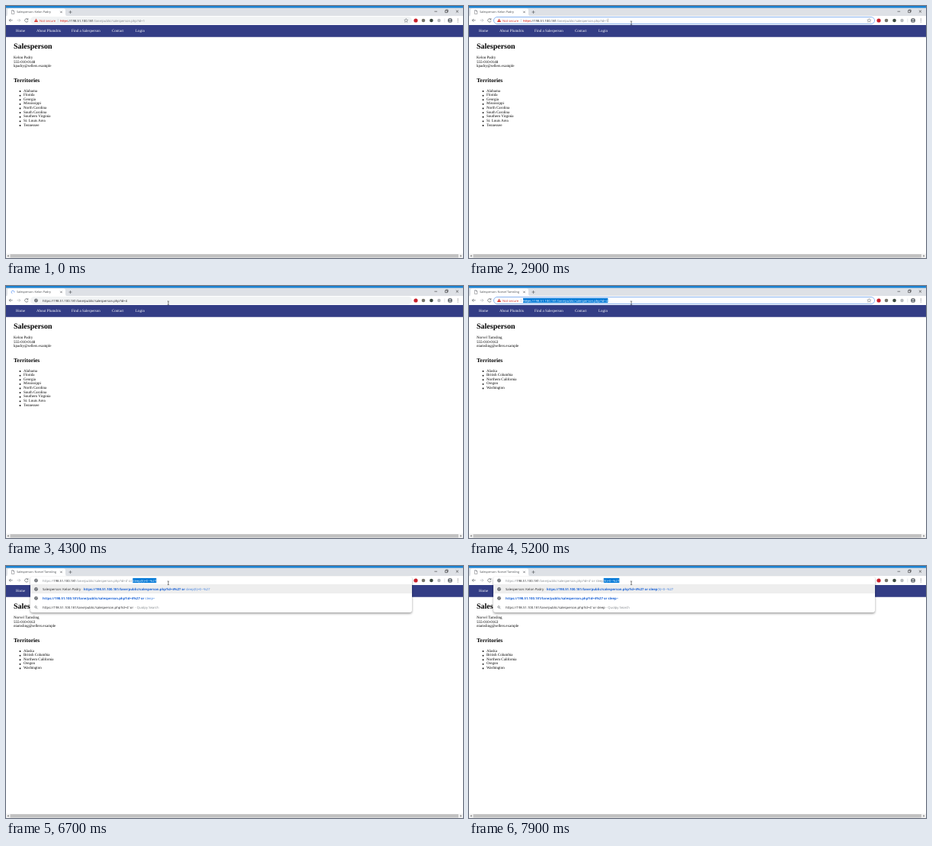
An HTML page that plays this animation: 600 by 331 pixels, repeating every 8 s.

```html
<!DOCTYPE html>
<html lang="en">
<head>
<meta charset="utf-8">
<title>Browser session</title>
<style>
  html, body { margin: 0; width: 100%; height: 100%; overflow: hidden; background: #fff; }
  #stage { position: absolute; left: 0; top: 0; width: 600px; height: 331px; overflow: hidden;
    text-rendering: geometricPrecision; }
  #stage > svg, #view { position: absolute; left: 0; top: 0; }
  #view div { position: absolute; box-sizing: border-box; }
  /* Text is set at desktop size (1920 wide) and scaled to the 600 wide stage */
  .t { white-space: pre; transform-origin: 0 0; transform: scale(.3125) translateY(-50%); }
  .ui { font: 13.4px/26px "Open Sans", "Noto Sans", sans-serif; color: #202124; }
  .row { font-size: 13.6px; }
  .tab { font-size: 12.2px; color: #45494d; }
  .page { font: 16px/26px "Liberation Serif", serif; color: #000; }
  .h1 { font-size: 32px; font-weight: bold; }
  .h2 { font-size: 24px; font-weight: bold; }
  .nav { color: #fff; }
  .red { color: #d93025; }
  .strike { color: #d93025; text-decoration: line-through; text-decoration-thickness: 1px; }
  .dim { color: #80868b; }
  .link { color: #3b7de0; }
  .link b { color: #1a62d6; }
  .sel, .sel span { background: #0078d7; color: #fff; }
  .sel { padding: 1px 0; }
  .caret { display: inline-block; width: 1.5px; height: 17px; background: #333; vertical-align: -3px; }
  .pill { left: 32px; top: 14px; width: 501px; height: 9.6px; border-radius: 5px; background: #f1f3f4; }
  .focus { background: #fff; border: .7px solid #8ab4f0; }
  .drop { left: 32px; top: 13.5px; width: 501px; border-radius: 3px; background: #fff;
    box-shadow: 0 1.5px 3px rgba(0, 0, 0, .4); }
  .hot { left: 32px; top: 24.4px; width: 501px; height: 12px; background: #eeeeee; }
</style>
</head>
<body>
<div id="stage">
  <svg width="600" height="331" fill="none" stroke="#5f6368" stroke-width=".7">
    <g stroke="none">
      <path fill="#dee1e6" d="M0 0h600v13.5H0z"/>
      <path fill="#1a82d2" d="M0 0h600v2.6H0z"/>
      <path fill="#fff" d="M0 13.5Q2 13 2 10.500V5.500Q2 3.200 4.300 3.200H75.700Q78 3.200 78 5.500V10.500Q78 13 80 13H600V25H0z"/>
      <path fill="#333d85" d="M0 25h600v15.800H0z"/>
      <path fill="#f1f1f1" d="M0 325.500h600v5.500H0z"/>
      <path fill="#c1c1c1" d="M5.500 326h588.500v4.500H5.500z"/>
      <path fill="#707070" d="M3.500 326.800v3l-1.800-1.500zM596.500 326.800v3l1.800-1.500z"/>
      <circle cx="538" cy="19" r="2.600" fill="#c8202b"/>
      <circle cx="548" cy="19" r="2.300" fill="#77756c"/>
      <circle cx="558.500" cy="19" r="2.300" fill="#3d4a40"/>
      <circle cx="568.500" cy="19" r="2.200" fill="#b5b8bb"/>
      <circle cx="583" cy="19" r="3" fill="#6a6f75"/>
      <circle cx="583" cy="18.200" r="1.100" fill="#c5c8cb"/>
      <path fill="#c5c8cb" d="M581 21.200q2-2.400 4 0z"/>
      <path fill="#5f6368" d="M592.800 16.500h.9v.9h-.9zM592.800 18.600h.9v.9h-.9zM592.800 20.700h.9v.9h-.9z"/>
    </g>
    <path d="M71.300 6.700l2.400 2.400m0-2.400l-2.400 2.400M82.500 8h4M84.500 6v4"/>
    <path stroke="#333" stroke-width=".6" d="M562.500 7.200h3.600M576.600 5.800h2.800v2.800h-2.800zM577.500 5.800v-.8h2.700v2.800h-.8M590.800 5.500l3.200 3.200m0-3.200l-3.200 3.200"/>
    <path d="M8.600 18.800H4.200m2-2l-2 2 2 2"/>
    <path stroke="#b4b7ba" d="M14.500 18.800h4.400m-2-2l2 2-2 2"/>
    <path d="M28.600 17.500a2.200 2.200 0 1 0 .4 2M28.900 16.200v1.700h-1.800"/>
    <path stroke="#dadce0" d="M575.800 16.500v5"/>
  </svg>
  <div id="view"></div>
</div>
<script>
const LOOP = 8000;
const URL_BASE = "https://198.51.100.181/lane/public/salesperson.php?id=";
const ATTACK = "4%27 or sleep(5)=0--%27";
const LINE = 5.625;
const PEOPLE = [
  { name: "Kelon Padry", phone: "555-010-0148", mail: "kpadry@sellers.example", id: "1",
    areas: ["Alabama", "Florida", "Georgia", "Mississippi", "North Carolina", "South Carolina",
      "Southern Virginia", "St. Louis Area", "Tennessee"] },
  { name: "Norvel Tamsling", phone: "555-010-0163", mail: "ntamsling@sellers.example", id: "4",
    areas: ["Alaska", "British Columbia", "Northern California", "Oregon", "Washington"] }
];
// Start time, address bar mode, person shown, typed value of the id
const STEPS = [
  [0, "idle", 0], [1900, "selected", 0], [2500, "caret", 0],
  [3400, "typing", 0, ""], [3600, "typing", 0, "4"],
  [4100, "loading", 0, "4"], [4500, "idle", 1],
  [5200, "selected", 1], [5700, "caret", 1],
  [6200, "typing", 1, "4'"], [6400, "typing", 1, "4' "], [6500, "typing", 1, "4' o"],
  [6600, "typing", 1, "4' or"], [6700, "typing", 1, "4' or "],
  [7200, "typing", 1, "4' or s"], [7400, "typing", 1, "4' or sl"], [7500, "typing", 1, "4' or sle"],
  [7700, "typing", 1, "4' or slee"], [7900, "typing", 1, "4' or sleep"]
];

const view = document.getElementById("view");
// y is the vertical middle of the capitals
const text = (x, y, html, cls) => `<div class="t ${cls}" style="left:${x}px;top:${y}px">${html}</div>`;
const svg = body => `<svg width="600" height="331" fill="none" stroke="#5f6368" stroke-width=".6"
  style="position:absolute;left:0;top:0">${body}</svg>`;
const globe = y => `<circle cx="39.5" cy="${y}" r="2.1" fill="#5f6368"/>
  <path stroke="#fff" stroke-width=".45" d="M38 ${y - .6}l1.300 .7 .2 1.300M39.800 ${y - 1.6}l.2 1 1.200 .3"/>`;
const lens = y => `<circle cx="39" cy="${y - .4}" r="1.300"/><path d="M40 ${y + .6}l1.500 1.500"/>`;

function page(person) {
  const nav = [[13, "Home"], [40, "About Plumdrix"], [86, "Find a Salesperson"], [139, "Contact"], [170, "Login"]];
  const bullets = person.areas.map((_, i) =>
    `<circle cx="18.500" cy="${112 + i * LINE}" r=".9" fill="#000" stroke="none"/>`).join("");
  return nav.map(([x, label]) => text(x, 33, label, "page nav")).join("")
    + text(10, 53, "Salesperson", "page h1")
    + [person.name, person.phone, person.mail].map((s, i) => text(10, 68.1 + i * LINE, s, "page")).join("")
    + text(10, 98.4, "Territories", "page h2")
    + person.areas.map((s, i) => text(22.5, 111.6 + i * LINE, s, "page")).join("")
    + svg(bullets);
}

function tab(person, loading, t) {
  const icon = loading
    ? `<circle cx="9" cy="8" r="1.900" stroke="#4285f4" stroke-dasharray="8 4" transform="rotate(${t * .36} 9 8)"/>`
    : `<path stroke-width=".5" d="M7.400 5.600h2.100l1.300 1.300v3.500H7.400zM9.400 5.700v1.300h1.300"/>`;
  return svg(icon) + text(13.8, 7.9, "Salesperson: " + person.name, "ui tab");
}

function address(person, mode, caret) {
  const [, host, path] = (URL_BASE + person.id).match(/^https(:\/\/[^/]+)(.*)$/);
  const focus = mode === "selected" || mode === "caret";
  const url = `<span class="strike">https</span><span>${host}</span><span class="dim">${path}</span>`;
  const star = `<path stroke-width=".5" d="M525.300 16.500l.7 1.600 1.800.2-1.300 1.200.4 1.800-1.600-.9-1.600.9.4-1.800-1.300-1.200 1.800-.2z"/>`;
  const warning = `<path fill="#d93025" stroke="none" d="M39.500 16.500l2.500 4.600h-5z"/>
    <path stroke="#fff" stroke-width=".5" d="M39.500 18v1.500m0 .4v.5"/><path stroke="#c4c7ca" d="M68.300 16.800v4.400"/>`;
  return `<div class="pill ${focus ? "focus" : ""}"></div>`
    + svg(star + warning)
    + text(44, 18.7, "Not secure", "ui red")
    + text(71, 18.7, mode === "selected" ? `<span class="sel">${url}</span>` : url + caret, "ui");
}

function suggestions(typed, caret) {
  const query = typed.replace("'", "%27");
  const matched = (URL_BASE + query).length;
  const link = id => {
    const full = URL_BASE + id;
    return `<span class="link"><b>${full.slice(0, matched)}</b>${full.slice(matched)}</span>`;
  };
  const titled = (person, id) => `Salesperson: ${person.name} <span class="dim">-</span> ${link(id)}`;
  const quoted = typed.includes("'");
  const rows = [
    ...(quoted ? [] : [titled(PEOPLE[1], "4")]),
    titled(PEOPLE[0], ATTACK),
    link("4%27 or sleep="),
    `${URL_BASE + typed}<span class="dim"> - Quolpy Search</span>`
  ];
  const rowY = i => 30.4 + i * 11.9;
  const completion = quoted ? `<span class="sel">${ATTACK.slice(query.length)}</span>` : caret;
  const [, scheme, host, path] = (URL_BASE + typed).match(/^(https:\/\/)([^/]+)(.*)$/);
  const icons = globe(19) + rows.map((_, i) => (i < rows.length - 1 ? globe : lens)(rowY(i))).join("");
  return `<div class="drop" style="height:${rows.length * 11.9 + 11.4}px"></div><div class="hot"></div>`
    + svg(icons)
    + text(48, 18.7, `<span class="dim">${scheme}</span>${host}<span class="dim">${path}</span>${completion}`, "ui")
    + rows.map((row, i) => text(48, rowY(i), row, "ui row")).join("");
}

function bar(mode, person, typed, caret) {
  if (mode === "typing") return suggestions(typed, caret);
  if (mode === "loading")
    return `<div class="pill"></div>` + svg(globe(19)) + text(48, 18.7, URL_BASE + typed, "ui");
  return address(person, mode, caret);
}

function draw(now) {
  const t = now % LOOP;
  const [start, mode, who, typed] = STEPS.findLast(step => step[0] <= t);
  const person = PEOPLE[who];
  const blinkOn = Math.floor((t - start) / 500) % 2 === 0;
  const caret = blinkOn ? `<span class="caret"></span>` : "";
  const pointer = t < 1900 ? "" :
    svg(`<path stroke="#222" d="M212 20h.7l.4.400.4-.400h.7M213.100 20.300v4M212 24.600h.7l.4-.400.4.400h.7"/>`);
  view.innerHTML = page(person) + tab(person, mode === "loading", t)
    + bar(mode, person, typed, mode === "idle" ? "" : caret) + pointer;
}

const begin = performance.now();
function tick() {
  draw(performance.now() - begin);
  requestAnimationFrame(tick);
}
tick();
</script>
</body>
</html>
```
